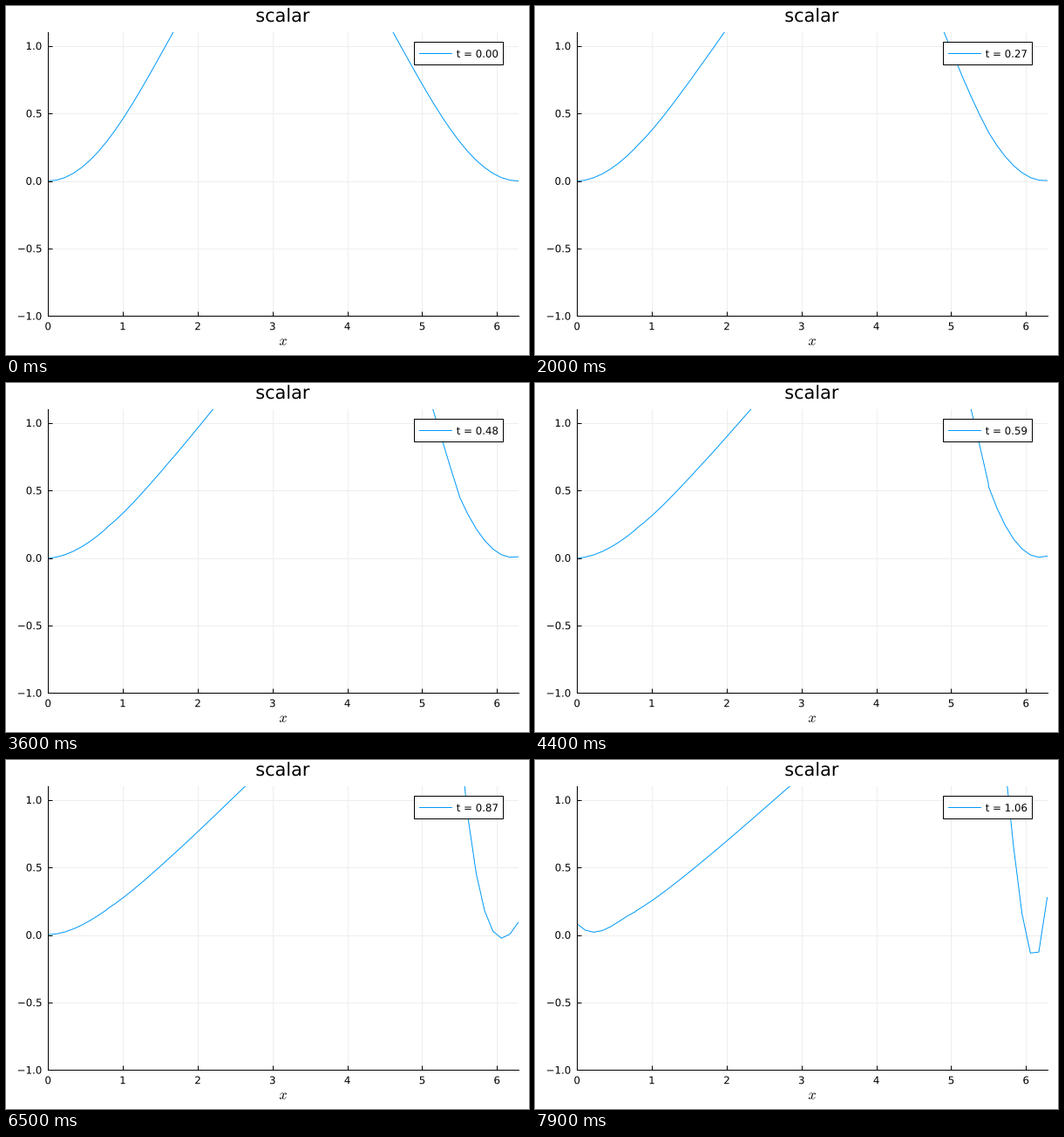
These frames come from a looping animation (600x400 px, 8 s). A matplotlib script:

```python
import numpy as np
import matplotlib.pyplot as plt
from matplotlib.animation import FuncAnimation
from matplotlib.patches import PathPatch, Rectangle
from matplotlib.textpath import TextPath
from matplotlib.transforms import Affine2D

W, H, DPI = 600, 400, 100
FRAMES, INTERVAL = 80, 100
DT, SUBSTEPS = 0.01344, 6
BLUE, GRID = "#009afa", "#eeeeee"
PX = 72 / DPI  # one pixel in points

# Burgers' equation: discontinuous Galerkin, cubic elements on a periodic domain
CELLS, SAMPLES = 8, 8
L = 2 * np.pi
h = L / CELLS
nodes = np.array([-1, -np.sqrt(0.2), np.sqrt(0.2), 1])
END_WEIGHT = 1 / 6


def powers(s):
    return np.vander(s, 4, increasing=True)


inv_v = np.linalg.inv(powers(nodes))
slopes = np.zeros((4, 4))
slopes[:, 1:] = powers(nodes)[:, :3] * [1, 2, 3]
D = slopes @ inv_v
fine = np.linspace(-1, 1, SAMPLES)
to_fine = powers(fine) @ inv_v
left = h * np.arange(CELLS)[:, None]


def spread(s):
    return left + h * (s + 1) / 2


def rhs(u):
    f = u**2 / 2
    a, b = u[:, -1], np.roll(u[:, 0], -1)
    speed = np.maximum(abs(a), abs(b))
    flux = (a**2 + b**2) / 4 + speed * (a - b) / 2
    du = -f @ D.T
    du[:, -1] -= (flux - f[:, -1]) / END_WEIGHT
    du[:, 0] += (np.roll(flux, 1) - f[:, 0]) / END_WEIGHT
    return du * 2 / h


def rk4(u, dt):
    k1 = rhs(u)
    k2 = rhs(u + dt / 2 * k1)
    k3 = rhs(u + dt / 2 * k2)
    k4 = rhs(u + dt * k3)
    return u + dt / 6 * (k1 + 2 * k2 + 2 * k3 + k4)


def solve():
    u = 1 - np.cos(spread(nodes))
    curves = []
    for _ in range(FRAMES):
        curves.append((u @ to_fine.T).ravel())
        for _ in range(SUBSTEPS):
            u = rk4(u, DT / SUBSTEPS)
    return curves


curves = solve()
xs = spread(fine).ravel()

plt.rcParams["font.family"] = "DejaVu Sans"
plt.rcParams["mathtext.fontset"] = "cm"
fig = plt.figure(figsize=(W / DPI, H / DPI), dpi=DPI, facecolor="white")
X0, X1, Y0, Y1 = 48.2, 587.6, 30.3, 355.3
ax = fig.add_axes([X0 / W, 1 - Y1 / H, (X1 - X0) / W, (Y1 - Y0) / H])
ax.set(xlim=(0, L), ylim=(-1, 1.1))
xticks, yticks = np.arange(7), np.arange(-1, 1.1, 0.5)
ax.set_xticks(xticks, [""] * len(xticks))
ax.set_yticks(yticks, [""] * len(yticks))
ax.tick_params(direction="in", length=5 * PX, width=PX)
ax.grid(color=GRID, linewidth=PX)
ax.set_axisbelow(True)
ax.spines[["top", "right"]].set_visible(False)
ax.spines[["left", "bottom"]].set_linewidth(PX)

# Overlay in pixel coordinates, y downwards
top = fig.add_axes([0, 0, 1, 1])
top.set(xlim=(0, W), ylim=(H, 0))
top.axis("off")


def glyphs(x, y, s, px=11.8, align=0.5):
    """Text outline with its baseline at y; align 0, 0.5, 1 is left, centre, right."""
    path = TextPath((0, 0), s, size=px)
    box = path.get_extents()
    shift = x - box.x0 - align * box.width
    return Affine2D().scale(1, -1).translate(shift, y).transform_path(path)


def label(*args, **kw):
    patch = PathPatch(glyphs(*args, **kw), facecolor="black", linewidth=0, snap=False)
    return top.add_patch(patch)


for v in xticks:
    label(X0 + v / L * (X1 - X0), 371.2, str(v))
for v in yticks:
    y = Y1 - (v + 1) / 2.1 * (Y1 - Y0)
    label(40.5, y + 4.3, f"{v:.1f}".replace("-", "\u2212"), align=1)
mid = (X0 + X1) / 2
label(mid, 18, "scalar", 20.8)
label(mid, 388.7, "$x$", 16.2)

top.add_patch(Rectangle((468.2, 41.2), 102, 26, facecolor="white",
                        edgecolor="black", linewidth=PX))
top.plot([474, 511], [54.2, 54.2], color=BLUE, linewidth=PX)


def clock_path(i):
    return glyphs(517, 58.9, f"t = {i * DT:.2f}", align=0)


clock = top.add_patch(PathPatch(clock_path(0), facecolor="black", linewidth=0, snap=False))
line, = ax.plot([], [], color=BLUE, linewidth=PX)


def draw(i):
    line.set_data(xs, curves[i])
    clock.set_path(clock_path(i))
    return line, clock


anim = FuncAnimation(fig, draw, frames=FRAMES, interval=INTERVAL,
                     repeat=True, repeat_delay=0)
plt.show()
```
